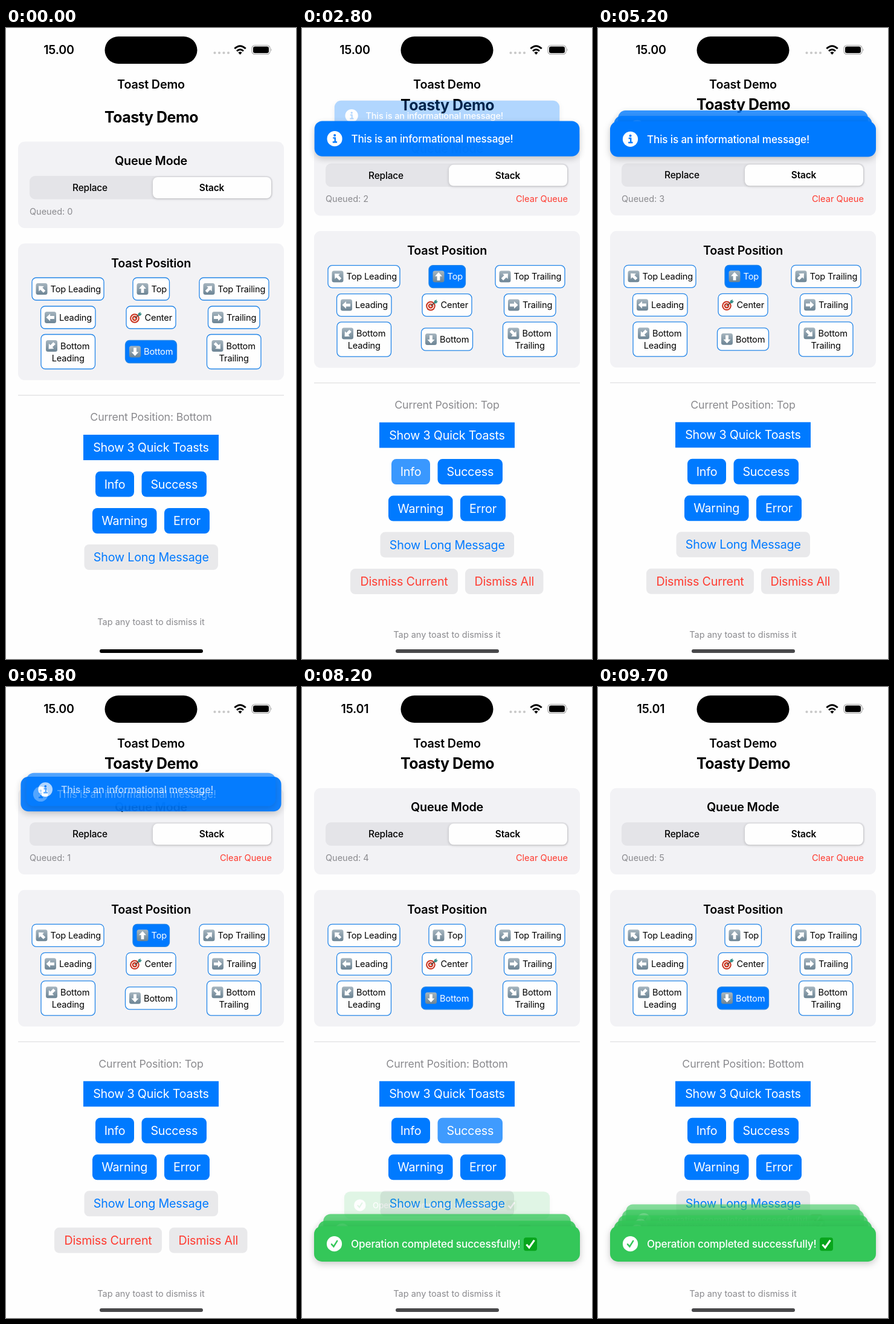
An HTML page for the animation above (9.8 s loop, 480 px wide and 1041 px high).

```html
<!DOCTYPE html>
<html lang="en">
<head>
<meta charset="utf-8">
<title>Toast Demo</title>
<style>
  html, body { margin: 0; width: 100%; height: 100%; overflow: hidden; background: #fefefe; }
  svg { display: block; width: 100%; height: 100%; font-family: Inter, Roboto, sans-serif; }
  .panel { fill: #f2f2f5; }
  .muted { fill: #8a8a8e; }
  .toast rect.body { filter: drop-shadow(0 4px 6px rgba(0, 0, 0, .2)); }
</style>
</head>
<body>
<svg id="stage" viewBox="0 0 480 1041" preserveAspectRatio="none">
  <defs>
    <linearGradient id="key" x2="0" y2="1">
      <stop stop-color="#a6b5bf"/><stop offset="1" stop-color="#6c8494"/>
    </linearGradient>
  </defs>
</svg>
<script>
const BLUE = '#007aff', GREEN = '#34c759', RED = '#ff3b30';
const PAGE = '#fefefe', SOFT = '#e9e9eb', GREY = '#a8a8a8', LOOP = 9800, STEP = 100;
const stage = document.getElementById('stage');

const rect = (x, y, w, h, r, attrs) =>
  `<rect x="${x}" y="${y}" width="${w}" height="${h}" rx="${r}" ${attrs}/>`;

// cy is the middle of the capital letters
function label(str, x, cy, size, attrs = '', anchor = 'middle', spacing = -.01) {
  return `<text x="${x}" y="${cy + size * .36}" font-size="${size}" text-anchor="${anchor}"
    letter-spacing="${spacing}em" ${attrs}>${str}</text>`;
}

function arrowKey(cx, cy, angle) {
  return `<g transform="translate(${cx} ${cy})">${rect(-9.5, -9.5, 19, 19, 3.5, 'fill="url(#key)"')}
    <path transform="rotate(${angle})" d="M0 -7L6 -.5H2.4V6.5H-2.4V-.5H-6Z" fill="#fff"/></g>`;
}

function target(cx, cy) {
  const ring = (r, c) => `<circle r="${r}" fill="${c}"/>`;
  return `<g transform="translate(${cx} ${cy})"><g transform="translate(-2 1.5)">
    ${ring(7.8, '#c8321e')}${ring(5.8, '#fff5f0')}${ring(4.2, '#c8321e')}${ring(2, '#fff5f0')}</g>
    <path d="M-2 1.5L6 -5" stroke="#5a4a46" stroke-width="1.5"/>
    <path d="M3 -3L4 -7L8 -9L7.5 -6.5L10 -6L7 -2.5Z" fill="#3a8f88"/></g>`;
}

const button = (id, str, x, y, w, fill, color, r = 8) =>
  `<g id="${id}">${rect(x, y, w, 42, r, `fill="${fill}"`)}${label(str, x + w / 2, y + 21, 19.7, `fill="${color}"`)}</g>`;

// name, second line, x, y, width, height, arrow angle
const cells = [
  ['Top Leading', '', 43, 412, 119, 37, -45],
  ['Top', '', 210, 412, 60.5, 37, 0],
  ['Top Trailing', '', 320, 412, 115, 37, 45],
  ['Leading', '', 57.5, 459, 90.5, 37, -90],
  ['Center', '', 199, 459, 82, 37, null],
  ['Trailing', '', 334.5, 459, 85.5, 37, 90],
  ['Bottom', 'Leading', 58, 505.5, 89.5, 57, -135],
  ['Bottom', '', 197.5, 515.5, 85, 37, 180],
  ['Bottom', 'Trailing', 332.5, 505.5, 89.5, 57, 135]
];
const TOP = 1, BOTTOM = 7;

function cell([name, second, x, y, w, h, angle], i) {
  const cy = second ? y + 19 : y + h / 2, ex = x + (second ? 17.5 : 16);
  return `<g id="cell${i}">${rect(x, y, w, h, 7, `stroke="#2486e8" stroke-width="1.3"`)}
    <g class="face">${angle === null ? target(ex, cy) : arrowKey(ex, cy, angle)}
    ${label(name, ex + 14.5, cy, 14.6, '', 'start')}
    ${second && label(second, x + w / 2, cy + 20, 14.6)}</g></g>`;
}

const status = `
  ${label('15.00', 87.5, 36, 19.7, 'id="clock" font-weight="600"')}
  ${rect(163.5, 14, 153, 45, 22.5, '')}
  ${[345.5, 353, 360.5, 368].map(x => `<circle cx="${x}" cy="41" r="2.1" fill="#c8c8c8"/>`).join('')}
  <g fill="none" stroke="#000" stroke-width="3">
    <path d="M378.3 34Q387.5 25.5 396.7 34"/><path d="M382 38Q387.5 33 393 38"/></g>
  <path d="M384.4 40.6Q387.5 38 390.6 40.6L387.5 44Z"/>
  ${rect(407, 28.5, 30, 15, 5, `fill="none" stroke="${GREY}" stroke-width="1.2"`)}
  ${rect(409, 30.5, 26, 11, 3.2, '')}
  <path d="M438.6 33.5Q440.8 36 438.6 38.5Z" fill="${GREY}"/>
  ${label('Toast Demo', 240, 92.5, 19.8, 'font-weight="600"')}`;

const content = `<g id="content">
  ${label('Toasty Demo', 240.5, 147, 25, 'font-weight="700"', 'middle', -.02)}
  ${rect(20, 187.5, 440, 142.5, 11, 'class="panel"')}
  ${label('Queue Mode', 240, 219, 19.8, 'font-weight="600"')}
  ${rect(39, 244, 402, 38.5, 9, 'fill="#e4e4e8"')}
  ${rect(243, 246, 196, 35, 8, `fill="${PAGE}" style="filter:drop-shadow(0 1px 2px #0003)"`)}
  ${label('Replace', 139, 263.5, 15.4, 'font-weight="500"')}
  ${label('Stack', 340.5, 263.5, 15.4, 'font-weight="600"')}
  ${label('', 39, 302.5, 14.5, 'id="queued" class="muted"', 'start', 0)}
  ${label('Clear Queue', 440, 302.5, 14.6, `id="clear" fill="${RED}"`, 'end', 0)}
  ${rect(20, 355.5, 440, 225.5, 11, 'class="panel"')}
  ${label('Toast Position', 240, 387.5, 19.8, 'font-weight="600"')}
  ${cells.map(cell).join('')}
  ${rect(20, 605.3, 440, 1.2, 0, 'fill="#dedee0"')}
  ${label('', 240, 642, 17.8, 'id="position" class="muted"')}
  ${button('quick', 'Show 3 Quick Toasts', 128, 671, 224, BLUE, '#fff', 0)}
  ${button('info', 'Info', 148, 731.5, 64, BLUE, '#fff')}
  ${button('success', 'Success', 224.5, 731.5, 107.5, BLUE, '#fff')}
  ${button('warning', 'Warning', 143, 792, 106.5, BLUE, '#fff')}
  ${button('error', 'Error', 262, 792, 75, BLUE, '#fff')}
  ${button('long', 'Show Long Message', 129.5, 852, 221.5, SOFT, BLUE)}
  <g id="dismiss">${button('current', 'Dismiss Current', 80, 912.5, 178, SOFT, RED)}
  ${button('all', 'Dismiss All', 270, 912.5, 129.5, SOFT, RED)}</g></g>
  ${label('Tap any toast to dismiss it', 240, 980, 14.5, 'id="hint" class="muted"', 'middle', 0)}`;

// Toasts stack behind the oldest one; each has a time to enter and to leave
const stacks = [
  { cy: 183.3, press: 'info', color: BLUE, text: 'This is an informational message!',
    times: [[2500, 4700], [2750, 5250], [3000, 5750], [3250, 6200]] },
  { cy: 918.7, press: 'success', color: GREEN, text: 'Operation completed successfully!',
    times: [[7600, 1e5], [7760, 1e5], [7950, 1e5], [8170, 1e5], [8700, 1e5]] }
];

function toast({ color, text }, id) {
  const info = color === BLUE;
  const glyph = info
    ? `<circle cx="-186.4" cy="-5.6" r="2" fill="${color}"/>
       <path d="M-189.3 -1.3H-185.8V5.7M-189.8 5.7H-182.5" fill="none" stroke="${color}" stroke-width="2.4"/>`
    : `<path d="M-191 .6L-187.6 4.4L-181.8 -4.8" fill="none" stroke="${color}" stroke-width="2.5" stroke-linecap="round"/>`;
  const tick = info ? '' : rect(127, -10.5, 22, 22, 4, 'fill="#08a51c"') +
    '<path d="M131.5 1L136 6L144.5 -6" fill="none" stroke="#fff" stroke-width="3.2"/>';
  return `<g id="${id}" class="toast">${rect(-220, -29.2, 440, 58.4, 13, `class="body" fill="${color}"`)}
    <circle cx="-186.5" r="12.6" fill="#fff"/>${glyph}
    ${label(text, -159, 0, 17.2, 'fill="#fff" font-weight="500"', 'start')}${tick}</g>`;
}

const toasts = stacks.map((s, n) => s.times.map((_, k) => toast(s, `toast${n}${k}`)).reverse().join('')).join('');
stage.insertAdjacentHTML('beforeend',
  status + content + toasts + rect(155, 1025, 171, 6, 3, 'id="home"'));

const $ = id => document.getElementById(id);
const clamp = v => Math.min(1, Math.max(0, v));
const ease = v => 1 - (1 - clamp(v)) ** 3;
const since = (t, start, length = 400) => ease((t - start) / length);

function drawStack(stack, n, t) {
  const { cy, times, press } = stack;
  times.forEach(([enter, leave], k) => {
    const depth = times.slice(0, k).reduce((d, [, out]) => d - since(t, out), k);
    const shown = since(t, enter) * (1 - since(t, leave));
    const scale = (1 - .03 * depth) * (.81 + .19 * shown);
    const y = cy - 9.9 * depth - 43 * (1 - shown);
    const el = $(`toast${n}${k}`);
    el.setAttribute('transform', `translate(240 ${y}) scale(${scale})`);
    el.setAttribute('opacity', shown * (1 - .1 * depth));
  });
  const held = Math.max(...times.map(([enter]) => t < enter ? 0 : 1 - clamp((t - enter) / 300)));
  $(press).setAttribute('opacity', 1 - .28 * held);
  const first = times[0][0], last = times[times.length - 1][1];
  return {
    count: times.filter(([enter, leave]) => enter <= t && t < leave).length,
    open: since(t, first) * (1 - since(t, last))
  };
}

function drawCells(t) {
  const selected = t >= 1900 && t < 6900 ? TOP : BOTTOM;
  const tapped = t < 1900 ? -1e4 : t < 6900 ? 1900 : 6900;
  cells.forEach((_, i) => {
    const on = i === selected, el = $(`cell${i}`), face = el.querySelector('.face');
    const fresh = on && t - tapped < 100;
    el.firstElementChild.setAttribute('fill', on ? BLUE : PAGE);
    face.setAttribute('fill', on && !fresh ? '#fff' : '#000');
    face.setAttribute('opacity', on ? .2 + .8 * clamp((t - tapped) / 500) : 1);
  });
  $('position').textContent = 'Current Position: ' + cells[selected][0];
}

function draw(t) {
  const states = stacks.map((s, n) => drawStack(s, n, t));
  const count = states[0].count + states[1].count;
  const open = Math.max(states[0].open, states[1].open);
  drawCells(t);
  $('clock').textContent = t < 6900 ? '15.00' : '15.01';
  $('queued').textContent = 'Queued: ' + count;
  $('clear').setAttribute('opacity', open);
  $('dismiss').setAttribute('opacity', open);
  $('content').setAttribute('transform', `translate(0 ${-20.7 * open})`);
  $('hint').setAttribute('transform', `translate(0 ${20.7 * open})`);
  $('home').setAttribute('fill', t < 2000 ? '#000' : '#48484a');
}

const start = performance.now();
function tick() {
  const t = (performance.now() - start) % LOOP;
  draw(Math.floor(t / STEP) * STEP);
  requestAnimationFrame(tick);
}
tick();
</script>
</body>
</html>
```
